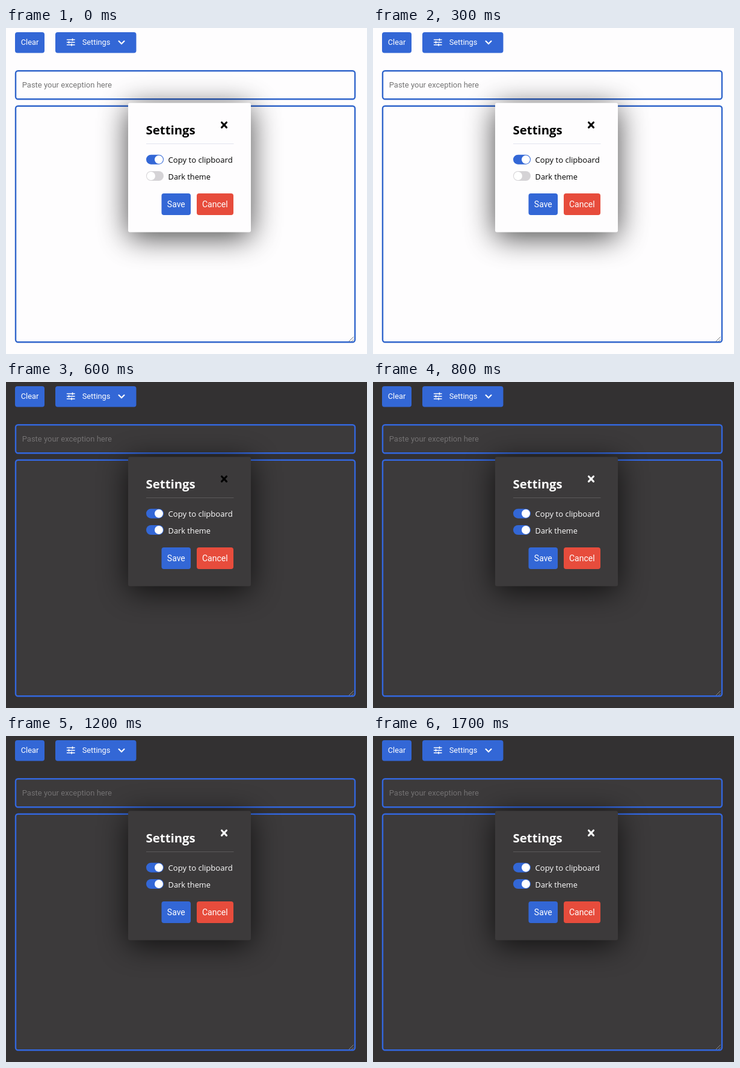
These frames come from a looping animation (600 by 542 pixels, 1800 ms). An HTML page:

```html
<!DOCTYPE html>
<html lang="en">
<head>
<meta charset="utf-8">
<title>Settings dialog</title>
<style>
  html, body { margin: 0; width: 100%; height: 100%; overflow: hidden; }
  svg { display: block; width: 100%; height: 100%; background: var(--page); }
  text { font: 12.8px Roboto, sans-serif; fill: #fff; }
  .blue { fill: #3367d6; }
  .red { fill: #e74c3c; }
  .field { fill: var(--panel); stroke: var(--border); stroke-width: 2.4; }
  .hint { font-size: 13px; fill: var(--hint); }
  .shadow { fill: #000; opacity: .72; filter: blur(25px); }
  .panel { fill: var(--panel); }
  .label { font: 13.1px "Open Sans", sans-serif; fill: var(--text); }
  .title { font: bold 20.4px "Open Sans", sans-serif; fill: var(--text); }
  .action { font-size: 14px; text-anchor: middle; }
  .line { fill: none; stroke: #fff; stroke-linecap: round; }
  .track { fill: var(--track); }
  .knob { fill: #fff; }
</style>
</head>
<body>
<svg viewBox="0 0 600 542">
  <rect class="blue" x="15" y="7" width="49" height="34.5" rx="4"/>
  <text x="39.5" y="28.3" text-anchor="middle">Clear</text>
  <rect class="blue" x="82" y="7" width="134.5" height="34.5" rx="4"/>
  <path class="line" stroke-width="1.5" d="M101.5 19.5h12.5M101.5 23.7h12.5M101.5 28h12.5M110.5 18v3M104.5 22.2v3M109 26.5v3"/>
  <text x="126.7" y="28.3">Settings</text>
  <path class="line" stroke-width="2.2" d="M187.5 21.8l4.5 4.4 4.5-4.4"/>

  <rect class="field" x="16" y="71.3" width="564" height="47" rx="4"/>
  <text class="hint" x="26.7" y="99.3">Paste your exception here</text>
  <rect class="field" x="16" y="129.7" width="564" height="392.6" rx="4"/>
  <path d="M570 521l7.5-7.5M574.5 521l3-3" stroke="var(--grip)"/>

  <rect class="shadow" x="203" y="132" width="204" height="216"/>
  <rect class="panel" x="203" y="124.5" width="204" height="215" rx="3"/>
  <text class="title" x="232.5" y="176.5">Settings</text>
  <path d="M358.5 157l8 8.4M366.5 157l-8 8.4" stroke="var(--close)" stroke-width="3.1" stroke-linecap="round"/>
  <path d="M233 192.5h145.5" stroke="var(--rule)"/>

  <rect class="blue" x="233" y="210.7" width="29" height="16" rx="8"/>
  <circle class="knob" cx="254" cy="218.7" r="7"/>
  <text class="label" x="269.6" y="223.8">Copy to clipboard</text>
  <rect class="track" x="233" y="238" width="29" height="16" rx="8"/>
  <circle class="knob" id="knob" cy="246" r="7"/>
  <text class="label" x="269.6" y="252" style="font-size:12.8px">Dark theme</text>

  <rect class="blue" x="258.5" y="275" width="48.5" height="36" rx="4"/>
  <text class="action" x="282.8" y="298">Save</text>
  <rect class="red" x="317" y="275" width="61" height="36" rx="4"/>
  <text class="action" x="347.3" y="298">Cancel</text>
</svg>
<script>
const LOOP = 1800;
const light = {
  page: '#fefdfe', panel: '#fefdfe', border: '#3065cb', hint: '#757575', text: '#000',
  close: '#000', rule: '#e2e3ee', track: '#d5d3d6', grip: '#777', knob: 241
};
const fading = {
  page: '#8a8889', panel: '#8f8d8e', border: '#3168e2', hint: '#7a7879', text: '#8f8d8e',
  close: '#000', rule: '#9c9a9b', track: '#fff', grip: '#4d4b4c', knob: 247.5
};
const settled = {
  page: '#333132', panel: '#3c3a3b', border: '#3367de', hint: '#737172', text: '#fff',
  close: '#000', rule: '#5b595a', track: '#3367d6', grip: '#8b898a', knob: 254
};
const dark = { ...settled, close: '#fff' };

const themeAt = t => t < 500 ? light : t < 600 ? fading : t < 700 ? settled : dark;
const knob = document.getElementById('knob');
const start = performance.now();

function draw() {
  const { knob: knobX, ...colors } = themeAt((performance.now() - start) % LOOP);
  for (const name in colors) document.documentElement.style.setProperty('--' + name, colors[name]);
  knob.setAttribute('cx', knobX);
  requestAnimationFrame(draw);
}
draw();
</script>
</body>
</html>
```
